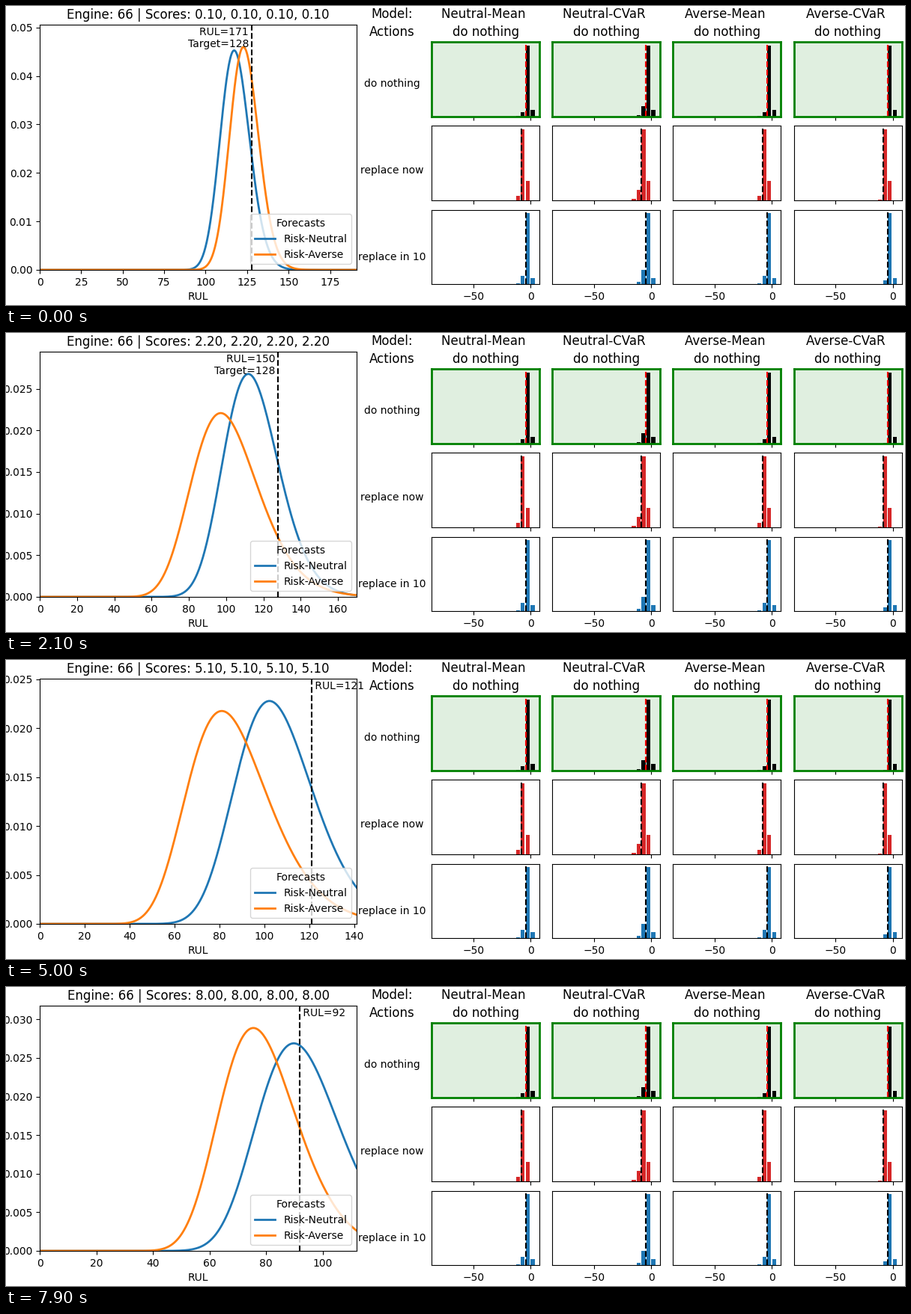
A matplotlib script for the animation above (8 s loop, 1200 px wide and 400 px high).

```python
import numpy as np
import matplotlib.pyplot as plt
from matplotlib.animation import FuncAnimation

W, H = 1200, 400
FRAMES, INTERVAL = 80, 100
FIRST_RUL, TARGET = 171, 128

plt.rcParams["font.family"] = "DejaVu Sans"
fig = plt.figure(figsize=(W / 100, H / 100), dpi=100, facecolor="white")


def add_axes(left, top, right, bottom):
    """Axes placed by pixel edges, with y counted from the top."""
    return fig.add_axes(
        [left / W, 1 - bottom / H, (right - left) / W, (bottom - top) / H])


# Key points of the forecasts: step, then mode and sigma of each model
KEYS = np.array([
    (0, 117.2, .075, 122.8, .0705),
    (8, 121.3, .0815, 119.2, .106),
    (21, 111.9, .132, 97.1, .183),
    (38, 107.8, .144, 91.5, .212),
    (50, 102.2, .169, 81.0, .221),
    (68, 79.4, .205, 66.6, .213),
    (79, 89.8, .163, 75.5, .180),
]).T


def forecast(x, mode, sigma):
    """Log-normal density given by its mode, and its peak value."""
    peak = np.exp(-sigma ** 2 / 2) / (mode * sigma * np.sqrt(2 * np.pi))
    return peak * np.exp(-np.log(x / mode) ** 2 / (2 * sigma ** 2)), peak


main = add_axes(45, 25, 468, 353)
main.set_xlabel("RUL")
title = main.set_title("")
curves = [main.plot([], [], lw=2, color=color, label=label)[0]
          for color, label in [("tab:blue", "Risk-Neutral"),
                               ("tab:orange", "Risk-Averse")]]
rul_line = main.axvline(TARGET, color="black", ls="--")
rul_text = main.text(0, 0.99, "", va="top",
                     transform=main.get_xaxis_transform())
main.legend(title="Forecasts", loc="lower right", bbox_to_anchor=(1, 0.003))

MODELS = ["Neutral-Mean", "Neutral-CVaR", "Averse-Mean", "Averse-CVaR"]
TAILS = [0.065, 0.15, 0.065, 0.01]
# Action: color, bin of the tallest bar, bar on its right, extra tail, mean
ACTIONS = {
    "do nothing": ("black", 1, 0.09, 0, -4.1),
    "replace now": ("tab:red", 2, 0.27, 0, -8.1),
    "replace in 10": ("tab:blue", 1, 0.09, 0.05, -4.1),
}
BIN, LAST_EDGE = 4.29, 4.0

labels = add_axes(470, 48, 560, 372)
labels.set_xlim(470, 560)
labels.set_ylim(372, 48)
labels.axis("off")
labels.set_title("Model:\nActions", linespacing=1.4)


def draw_hist(row, col, color, peak_bin, right, extra, mean):
    left, top = 568.1 + 161.15 * col, 48 + 112.3 * row
    ax = add_axes(left, top, left + 144, top + 99.8)

    # Bins count from the right; the left tail decays geometrically
    tail = TAILS[col] + extra
    bins = peak_bin + np.arange(-1, 3)
    ax.bar(LAST_EDGE - BIN * (bins + 0.5), [right, 1, tail, tail ** 2],
           width=0.8 * BIN, color=color)
    mean -= 10 * max(TAILS[col] - TAILS[0], 0)
    ax.axvline(mean, color="black" if row else "red", ls="--")

    ax.set_xlim(-86.5, 7.85)
    ax.set_ylim(0, 1.05)
    ax.set_xticks([-50, 0])
    ax.set_yticks([])
    ax.tick_params(labelbottom=row == 2)
    if row == 0:
        ax.set_title(MODELS[col] + " \ndo nothing", linespacing=1.4)
        ax.set_facecolor(("green", 0.12))
        for spine in ax.spines.values():
            spine.set(color="green", linewidth=2)


for row, (action, style) in enumerate(ACTIONS.items()):
    labels.text(515, 104 + 116 * row, action, ha="center", va="center",
                clip_on=True)
    for col in range(len(MODELS)):
        draw_hist(row, col, *style)


def update(step):
    rul = FIRST_RUL - step
    x = np.linspace(0.01, rul + 20, 500)
    params = [np.interp(step, KEYS[0], values) for values in KEYS[1:]]
    peaks = []
    for curve, mode, sigma in zip(curves, params[::2], params[1::2]):
        y, peak = forecast(x, mode, sigma)
        curve.set_data(x, y)
        peaks.append(peak)
    main.set_xlim(0, rul + 20)
    main.set_ylim(0, 1.1 * max(peaks))

    mark = min(rul, TARGET)
    rul_line.set_xdata([mark, mark])
    rul_text.set_x(mark)
    if rul > TARGET:
        rul_text.set(text=f"RUL={rul} \nTarget={TARGET} ", ha="right")
    else:
        rul_text.set(text=f" RUL={rul}", ha="left")

    score = f"{(step + 1) / 10:.2f}"
    title.set_text("Engine: 66 | Scores: " + ", ".join([score] * 4))
    return *curves, rul_line, rul_text, title


anim = FuncAnimation(fig, update, frames=FRAMES, interval=INTERVAL,
                     repeat=True, blit=False)
plt.show()
```
